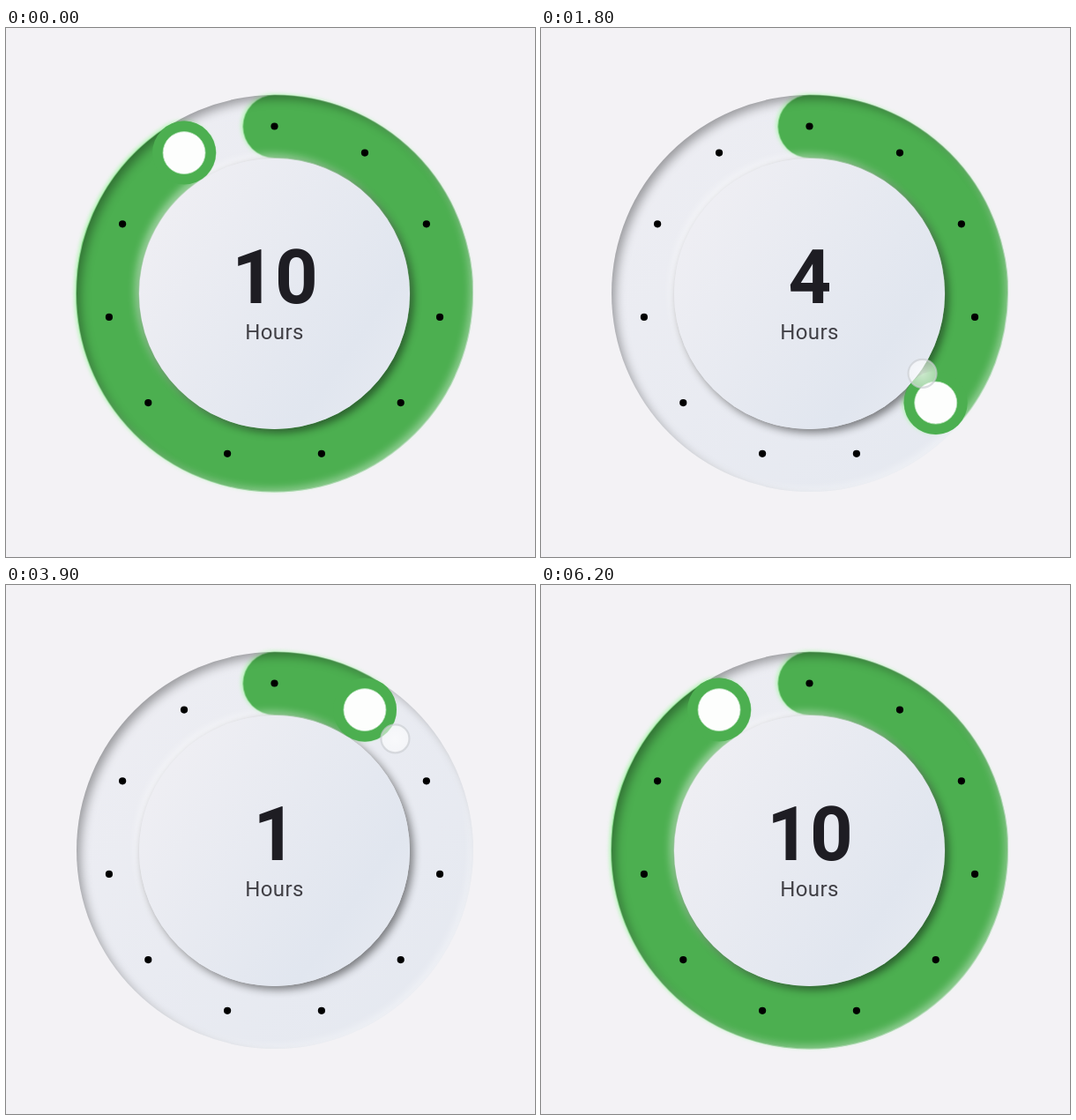
Write an HTML page that moves like this. It is 600 by 600 pixels and loops after 6300 ms.

```html
<!DOCTYPE html>
<html lang="en">
<head>
<meta charset="utf-8">
<title>Hours dial</title>
<style>
  html, body { margin: 0; width: 100%; height: 100%; overflow: hidden; background: #f3f2f5; }
  #stage { position: relative; width: 600px; height: 600px; }
  #stage > * { position: absolute; }
  svg { left: 0; top: 0; }
  .disc { border-radius: 50%; }
  .track, .shade { left: 79.5px; top: 76px; width: 450px; height: 450px; }
  .track { background: linear-gradient(135deg, #eeeef3, #e4e8f0); }
  .shade {
    box-shadow: inset 6px 6px 12px -2px rgba(0, 0, 0, .36),
                inset -5px -5px 10px -2px rgba(255, 255, 255, .42);
  }
  .face {
    left: 151px; top: 147.5px; width: 307px; height: 307px;
    background: linear-gradient(125deg, #eeeef3 15%, #e1e6ef 75%, #e8ebf2);
    box-shadow: 4px 4px 10px rgba(0, 0, 0, .48), -4px -4px 10px rgba(255, 255, 255, .5);
  }
  #arc { filter: drop-shadow(1px -2px 2px #b4f5b6); }
  text { font-family: Roboto, sans-serif; text-anchor: middle; }
  #number { font-size: 85px; font-weight: 700; fill: #1e1d23; }
  #unit { font-size: 24px; letter-spacing: .4px; fill: #414046; }
</style>
</head>
<body>
<div id="stage">
  <div class="disc track"></div>
  <svg width="600" height="600">
    <circle id="arc" cx="304.5" cy="301" r="189.3" pathLength="11" fill="none" stroke="#4caf50"
      stroke-width="71.5" stroke-linecap="round" transform="rotate(-90 304.5 301)"/>
  </svg>
  <div class="disc shade"></div>
  <div class="disc face"></div>
  <svg width="600" height="600">
    <defs>
      <radialGradient id="glass">
        <stop offset="0" stop-color="#fff" stop-opacity=".72"/>
        <stop offset="1" stop-color="#fff" stop-opacity=".52"/>
      </radialGradient>
    </defs>
    <g id="dots"></g>
    <g id="knob">
      <circle r="36" fill="#4caf50"/>
      <circle r="24" fill="#fdfefd" stroke="#b9e2bb" stroke-width=".8"/>
    </g>
    <text id="number" x="305" y="312"></text>
    <text id="unit" x="304.5" y="353">Hours</text>
    <circle id="touch" r="16" fill="url(#glass)" stroke="#c9cdd2" stroke-opacity=".65" stroke-width="2.2"/>
  </svg>
</div>
<script>
  const LOOP = 6300, STEP = 100, COUNT = 11;
  const $ = id => document.getElementById(id);

  // Finger path: time in ms, dial position in hours, distance from the centre
  const drag = [
    [200, 9.9, 186], [700, 0.2, 180], [800, 0.4, 180], [1000, 3.5, 182], [1300, 6, 178],
    [1500, 5.8, 168], [1800, 3.83, 157], [2100, 1.2, 160], [2200, 1.4, 162], [2700, 9.6, 164],
    [2800, 9.71, 165], [2900, 9.3, 170], [3400, 4.7, 187], [3500, 4.3, 187], [3850, 1, 186],
    [4200, 4.1, 190], [4400, 5.45, 192], [4900, 9.4, 182], [5000, 9.8, 180],
    [5600, 1.1, 182], [5700, 0.2, 184], [5800, -0.8, 186], [5900, -1, 188]
  ];

  function polar(hour, radius) {
    const a = hour / COUNT * 2 * Math.PI;
    return [304.5 + radius * Math.sin(a), 301 - radius * Math.cos(a)];
  }

  function place(el, hour, radius) {
    el.setAttribute("transform", `translate(${polar(hour, radius)})`);
  }

  function fingerAt(t) {
    const last = drag[drag.length - 1];
    if (t <= drag[0][0]) return drag[0];
    if (t >= last[0]) return last;
    const i = drag.findIndex(k => k[0] > t);
    const a = drag[i - 1], b = drag[i], p = (t - a[0]) / (b[0] - a[0]);
    return a.map((v, j) => v + (b[j] - v) * p);
  }

  for (let i = 0; i < COUNT; i++) {
    const dot = document.createElementNS("http://www.w3.org/2000/svg", "circle");
    dot.setAttribute("r", 4.1);
    place(dot, i, 189.5);
    $("dots").append(dot);
  }

  function draw(now) {
    const t = Math.floor(now % LOOP / STEP) * STEP;
    const [, hour, radius] = fingerAt(t);
    const value = (Math.round(hour) + COUNT) % COUNT;
    $("arc").setAttribute("stroke-dasharray", `${value} 99`);
    $("number").textContent = value;
    place($("knob"), value, 189.5);
    place($("touch"), hour, radius);
    $("touch").style.display = t >= drag[0][0] && t <= 5900 ? "" : "none";
  }

  const start = performance.now();
  function tick() {
    draw(performance.now() - start);
    requestAnimationFrame(tick);
  }
  tick();
</script>
</body>
</html>
```
